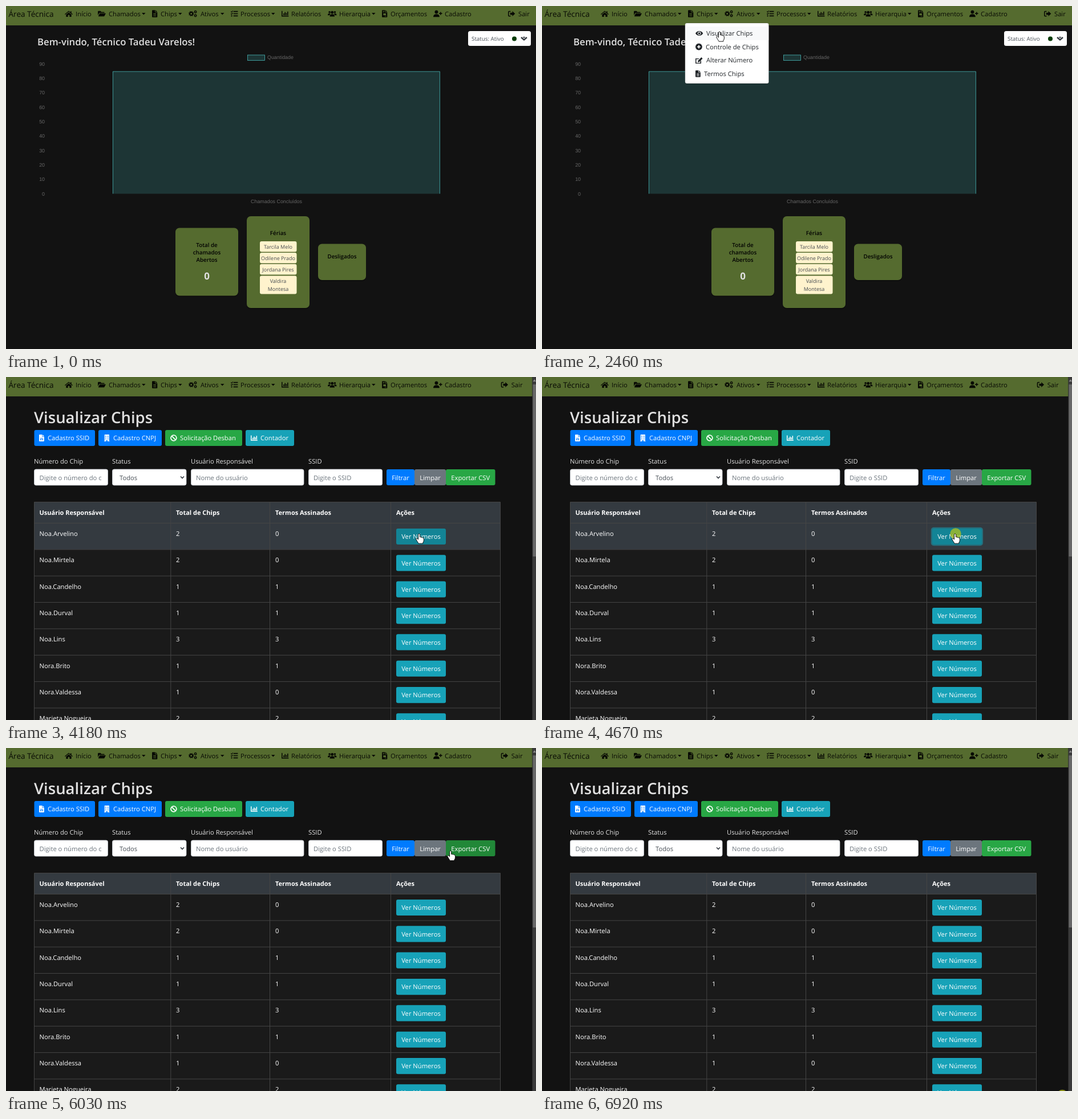
These frames come from a looping animation (929x602 px, 6990 ms). An HTML page:

```html
<!DOCTYPE html>
<html lang="pt-BR">
<head>
<meta charset="utf-8">
<title>Área Técnica</title>
<style>
  html, body { margin: 0; width: 100%; height: 100%; overflow: hidden; background: #121212; }
  svg { display: block; width: 929px; height: 602px; }
  text { font-family: "Open Sans", "Noto Sans", sans-serif; text-rendering: geometricPrecision; white-space: pre; }
  .b { font-weight: 700; }
  .s { font-weight: 600; }
  .m { text-anchor: middle; }
  .e { text-anchor: end; }
  .a { font-family: "Liberation Sans", Arial, sans-serif; }
</style>
</head>
<body>
<svg id="stage" viewBox="0 0 929 602" xmlns="http://www.w3.org/2000/svg"></svg>
<script>
const LOOP = 6990, PAGE = 3010, OPEN = 4730, CLOSE = 5690;
const OLIVE = '#556b2f', BG = '#121212', ROW = '#1a1a1a', SLATE = '#343a40', LIGHT = '#e0e0e0';
const BLUE = '#007bff', GREEN = '#28a745', TEAL = '#17a2b8', GREY = '#6c757d';

const txt = (x, y, s, fill = '#fff', size = 11.2, cls = '') =>
  `<text x="${x}" y="${y}" fill="${fill}" font-size="${size}" class="${cls}">${s}</text>`;
const box = (x, y, w, h, fill, r = 0, more = '') =>
  `<rect x="${x}" y="${y}" width="${w}" height="${h}" rx="${r}" fill="${fill}" ${more}/>`;
const line = (x1, y1, x2, y2, color) => `<path d="M${x1} ${y1}L${x2} ${y2}" stroke="${color}" stroke-width="1"/>`;
const path = d => `<path d="${d}"/>`;
const group = (id, s) => `<g id="${id}">${s}</g>`;

// Boxes that change colour under the pointer
const hots = [];
function hot(scene, x, y, w, h, base, over, r = 0) {
  hots.push({ scene, x, y, w, h, base, over });
  return box(x, y, w, h, base, r, `id="hot${hots.length - 1}"`);
}

const gear = (x, y, r) =>
  `<g fill="none" stroke="currentColor"><circle cx="${x}" cy="${y}" r="${r}" stroke-width="${r * .8}"/>` +
  `<circle cx="${x}" cy="${y}" r="${r * 1.55}" stroke-width="${r * .5}" stroke-dasharray="${r * .66} ${r * .557}"/></g>`;
const stroke = (d, w) => `<path d="${d}" fill="none" stroke="currentColor" stroke-width="${w}"/>`;
const sheet = 'M0 1.2Q0 0 1.2 0H7v5h5v9.8Q12 16 10.8 16H1.2Q0 16 0 14.8zM8 0l4 4H8z';

const icons = {
  home: path('M9 1.5 0 9l1 1.2 8-6.6 8 6.6L18 9l-3-2.5V2.5h-2.2v2.2zM9 5 3 10v5h4.3v-4h3.4v4H15v-5z'),
  folder: path('M0 12V3.5Q0 2 1.5 2H6l2 2h5.5Q15 4 15 5.5V6H4.5Q3 6 2.3 7.3zM1 14 3.7 8Q4.2 7 5.2 7H18l-3 6q-.5 1-1.5 1z'),
  file: path(sheet + 'M3 7.5h6v1H3zM3 10h6v1H3zM3 12.5h6v1H3z'),
  invoice: path(sheet + 'M2 2h3v1H2zM2 4h3v1H2zM3 7.5h6v4H3zM6 13h4v1H6z'),
  sim: path(sheet + 'M2.5 8h7v1.4h-7zM2.5 10.8h3v2.4h-3zM6.7 10.8h2.8v2.4H6.7z'),
  cogs: gear(6, 8, 3.3) + gear(15.5, 3.8, 2) + gear(15.5, 12.2, 2),
  tasks: path('M6 2h10v2H6zM6 7h10v2H6zM6 12h10v2H6z') + stroke('M.3 3 1.8 4.5 4.6 1.3M.3 8 1.8 9.5 4.6 6.3', 1.5) + '<circle cx="2" cy="13" r="1.5"/>',
  chart: path('M0 2h2v10.5h14v2H0zM4 7.5h2v4H4zM7 4.5h2v7H7zM10 6.5h2v5h-2zM13 3h2v8.5h-2z'),
  users: '<circle cx="4" cy="4.5" r="2.3"/><circle cx="16" cy="4.5" r="2.3"/><circle cx="10" cy="5" r="3.2"/>' +
    path('M0 11.5Q0 7.5 3.5 7.5 5.5 7.5 6.3 8.4 4.5 9.5 4.2 11.5zM20 11.5Q20 7.5 16.500 7.5 14.500 7.5 13.700 8.4 15.500 9.500 15.800 11.500zM4.500 14.500Q4.500 9 10 9t5.500 5.500z'),
  userPlus: '<circle cx="7" cy="4.200" r="3.800"/>' + path('M0 15.500Q0 9 7 9t7 6.500zM15.500 4h2v2.500H20v2h-2.500V11h-2V8.500H13v-2h2.500z'),
  exit: path('M6 1.500H2.500Q0 1.500 0 4v8q0 2.500 2.500 2.500H6v-2H3Q2 12.500 2 11.500v-7Q2 3.500 3 3.500h3zM10 2l6.500 6L10 14v-3.500H5v-5h5z'),
  eye: path('M0 8Q3 2.500 9 2.500T18 8Q15 13.500 9 13.500T0 8zM9 4a4 4 0 1 0 .01 0zM9 5.500a2.500 2.500 0 1 1-.01 0z'),
  plus: path('M8 0a8 8 0 1 0 .01 0zM6.800 4h2.400v2.800H12v2.400H9.200V12H6.800V9.200H4V6.800h2.800z'),
  edit: path('M0 3.500h9l-2 2H2V14h9.500V10l2-2v8H0zM6 9 14 1l3 3-8 8-3.500.5z'),
  building: path('M1 0h11v15h1v1H8v-3H5v3H0v-1h1zM3 2.500h2v2H3zM8 2.500h2v2H8zM3 5.800h2v2H3zM8 5.800h2v2H8zM3 9.200h2v2H3zM8 9.200h2v2H8z'),
  ban: '<circle cx="8" cy="8" r="6.700" fill="none" stroke="currentColor" stroke-width="2.400"/>' + stroke('M3.500 3.500l9 9', 2.400),
  times: stroke('M3 3l10 10M13 3 3 13', 3.600),
  history: stroke('M2.600 5.500A6.300 6.300 0 1 1 3.500 12.500M8.300 4.500v4l2.700 1.800', 2) + path('M.5 1v6h6z')
};
const icon = (name, x, cy, size, color = '#0b0e06') =>
  `<g transform="translate(${x} ${cy - size / 2}) scale(${size / 16})" fill="${color}" color="${color}" fill-rule="evenodd">${icons[name]}</g>`;

function nav() {
  const ink = '#080a04';
  const items = [
    ['home', 103, 122, 'Início'], ['folder', 161, 180, 'Chamados', 238], ['file', 256, 271, 'Chips', 302],
    ['cogs', 320, 341, 'Ativos', 376], ['tasks', 394, 411, 'Processos', 465], ['chart', 483, 500, 'Relatórios'],
    ['users', 564, 584, 'Hierarquia', 641], ['invoice', 659, 674, 'Orçamentos'], ['userPlus', 749, 769, 'Cadastro']
  ];
  return box(0, 0, 929, 34, OLIVE) + txt(4.5, 19, 'Área Técnica', ink, 13.6) +
    items.map(([name, ix, tx, label, caret]) => icon(name, ix, 13.5, 12.4, ink) + txt(tx, 18, label, ink) +
      (caret ? `<path d="M${caret} 12h6.500l-3.250 3.500z" fill="${ink}"/>` : '')).join('') +
    group('exit', icon('exit', 880, 13.5, 12, ink) + txt(898, 18, 'Sair', ink));
}

function dashboard() {
  const card = (x, y, w, h) => box(x, y + 2, w, h, 'rgba(0,0,0,.3)', 7) + box(x, y, w, h, OLIVE, 7);
  const head = (x, y, s) => txt(x, y, s, '#000', 9.8, 's m');
  const tag = (y, h, ...names) => box(445, y, 64.5, h, '#fff3cd', 3) +
    names.map((n, i) => txt(477, y + 12.8 + i * 14, n, '#454b50', 9, 'm')).join('');
  let s = txt(55, 69, 'Bem-vindo, Técnico Tadeu Varelos!', LIGHT, 16.7, 's');
  s += box(810, 44, 110, 26, '#fff', 3.500) + txt(816, 61, 'Status: Ativo', '#495057', 9.8) +
    '<circle cx="891" cy="57.500" r="4" fill="#063b06"/>' +
    '<path d="M903 55l5 4.500 5-4.500" fill="none" stroke="#343a40" stroke-width="2.400"/><path d="M905.500 54h5l-2.500 2.500z" fill="#343a40"/>';
  s += box(423.5, 86, 30, 9.5, '#1d3535', 0, 'stroke="#4bc0c0" stroke-width=".75"') + txt(458, 93, 'Quantidade', '#666', 8.9, 'a');
  for (let i = 0; i < 10; i++) s += txt(68, 332.5 - i * 25.3, i * 10, '#666', 8.9, 'a e');
  s += box(187.4, 115, 573, 214.5, '#1d3535', 0, 'id="bar"') +
    '<path d="M187.400 329.500V115h573v214.500" fill="none" stroke="#4bc0c0" stroke-width=".75"/>' +
    txt(474, 346, 'Chamados Concluídos', '#666', 8.9, 'a m');
  s += card(297, 389.5, 110, 119) + head(352, 422.5, 'Total de') + head(352, 436, 'chamados') + head(352, 448.5, 'Abertos') +
    txt(352, 480, '0', LIGHT, 17, 'b m');
  s += card(422, 369, 110, 161) + head(477, 402, 'Férias') + tag(413, 18.5, 'Tarcila Melo') + tag(433, 18.5, 'Odilene Prado') +
    tag(453, 18.5, 'Jordana Pires') + tag(473.5, 32, 'Valdira', 'Montesa');
  s += card(547, 417.5, 84, 63.5) + head(589, 443, 'Desligados');
  s += group('tip', box(481, 102, 103, 27, 'rgba(0,0,0,.8)', 4) + '<path d="M481 111v8l-4.500-4z" fill="rgba(0,0,0,.8)"/>' +
    txt(485.5, 112.5, 'Chamados Concluídos', '#fff', 8.9, 'a b') +
    box(486, 117.5, 8, 8, '#1d3535', 0, 'stroke="#4bc0c0" stroke-width=".8"') + txt(497.5, 125, 'Quantidade: 85', '#fff', 8.9, 'a'));
  return s;
}

function menu() {
  const items = [['eye', 288, 'Visualizar Chips'], ['plus', 287, 'Controle de Chips'], ['edit', 288, 'Alterar Número'], ['file', 284, 'Termos Chips']];
  return box(250.8, 30, 146.7, 106, '#fff', 3, 'stroke="rgba(0,0,0,.25)" stroke-width=".7"') + box(251.2, 36, 146, 24, '#f8f9fa', 0, 'id="pick"') +
    items.map(([name, x, label], i) => `<g${i ? '' : ' id="first"'}>` + icon(name, 269, 48 + i * 23.6, 11.8, '#212529') +
      txt(x, 52 + i * 23.6, label, '#212529') + '</g>').join('');
}

function chipsPage() {
  const button = (x, w, color, over, name, ix, tx, label) =>
    hot(1, x, 93, w, 28, color, over, 3) + icon(name, ix, 107, 11.8, '#fff') + txt(tx, 111, label);
  const field = (x, w, label, hint, tx, color = GREY) => txt(x, 151.5, label, LIGHT) +
    box(x + .5, 162, w - 1, 28, '#fff', 3, 'stroke="#ced4da" stroke-width=".8"') + txt(tx, 181, hint, color);
  const action = (x, w, color, over, label) => hot(1, x, 162, w, 28, color, over, 3) + txt(x + w / 2, 180.5, label, '#fff', 11.2, 'm');
  const rows = [['Noa.Arvelino', 2, 0], ['Noa.Mirtela', 2, 0], ['Noa.Candelho', 1, 1], ['Noa.Durval', 1, 1],
    ['Noa.Lins', 3, 3], ['Nora.Brito', 1, 1], ['Nora.Valdessa', 1, 0], ['Marieta Nogueira', 2, 2]];

  let s = txt(49, 81, 'Visualizar Chips', LIGHT, 27.5, 's');
  s += button(49.5, 106.5, BLUE, '#0069d9', 'sim', 58, 73, 'Cadastro SSID') + button(162, 111, BLUE, '#0069d9', 'building', 172, 188, 'Cadastro CNPJ') +
    button(279, 135, GREEN, GREEN, 'ban', 288, 305, 'Solicitação Desban') + button(420, 85, TEAL, '#138496', 'chart', 429, 446, 'Contador');
  s += field(49, 130, 'Número do Chip', 'Digite o número do c', 58.5) + field(186, 130.5, 'Status', 'Todos', 199, '#495057') +
    '<path d="M306 174.500l3 3 3-3" fill="none" stroke="#343a40" stroke-width="1.600"/>' +
    field(324, 198.5, 'Usuário Responsável', 'Nome do usuário', 333) + field(530, 130, 'SSID', 'Digite o SSID', 539);
  s += action(667, 49, BLUE, '#0069d9', 'Filtrar') + action(716, 55, GREY, '#5a6268', 'Limpar') + action(771, 86.5, GREEN, '#218838', 'Exportar CSV');

  s += box(49.5, 219.5, 817, 37, SLATE);
  [[58.5, 'Usuário Responsável'], [298, 'Total de Chips'], [472, 'Termos Assinados'], [684, 'Ações']]
    .forEach(([x, label]) => s += txt(x, 242, label, '#fff', 11, 'b'));
  rows.forEach(([name, total, signed], i) => {
    const y = 256.5 + i * 46.35;
    s += hot(1, 49.5, y, 817, 46.35, ROW, SLATE) + line(49.5, y, 866.5, y, '#454545') +
      txt(58.5, y + 22.5, name) + txt(298, y + 22.5, total) + txt(472, y + 22.5, signed);
    if (!i) s += box(681.7, y + 7.2, 91.4, 32.6, 'rgba(23,162,184,.5)', 5, 'id="ring"');
    s += hot(1, 684, y + 9.4, 87, 28.2, TEAL, '#138496', 3) + txt(727.5, y + 27.8, 'Ver Números', '#fff', 11.2, 'm');
  });
  s += line(49.5, 219.5, 866.5, 219.5, '#454545');
  [49.5, 288.8, 462.5, 674.5, 866.5].forEach(x => s += line(x, 219.5, x, 602, '#454545'));
  s += box(922.5, 0, 6.5, 602, BG);
  s += group('scroll', box(922.5, 0, 6.5, 602, '#3a3a3a') + box(923.5, 13, 5.5, 302, '#686868') + '<path d="M923.500 8l3-4 2.500 4z" fill="#8a8a8a"/>');
  return s;
}

function modal() {
  const lines = (x, y, list, cls = '', size = 11.2) => list.map((v, i) => txt(x, y + i * 17.8, v, '#fff', size, cls)).join('');
  const head = (x, ...list) => lines(x, 130 - (list.length - 1) * 17.6, list, 'b', 11);
  const row = (y, phone, kind) => hot(2, 176, y, 564, 71.5, ROW, '#363c43') + txt(185, y + 23, phone) +
    box(187, y + 28.5, 15.5, 19.5, '#dc3545', 2.500) + icon('times', 189.7, y + 38.5, 10, '#fff') +
    icon('history', 209, y + 37, 10.5, BLUE) + `<circle cx="228.300" cy="${y + 37}" r="5.500" fill="#25d366"/>` +
    lines(288.5, y + 23, ['Não', 'disponível']) + lines(367, y + 23, ['Falavento', kind]) + lines(479, y + 23, ['00.123.456/0001-', '00']) +
    lines(591.5, y + 23, ['CASA DE', 'ENSINO TALVEI', 'LTDA - ZULO']) + icon('file', 697, y + 18.5, 12, GREEN);
  let s = box(0, 0, 929, 602, 'rgba(0,0,0,.5)') + box(164.3, 14, 587, 348, OLIVE, 3.5, 'stroke="rgba(0,0,0,.2)"');
  s += txt(175.5, 43, 'Números de Noa.Arvelino', '#fff', 13.7, 's') + icon('times', 727.5, 37, 11, '#c3ccb4');
  s += line(164.5, 60, 751, 60, '#465927') + line(164.5, 311.5, 751, 311.5, '#465927');
  s += box(176, 72, 564, 72.5, SLATE) + head(185, 'Número') + head(288.5, 'Próxima', 'Troca') + head(367, 'Observação', '(Tipo', 'Falavento)') +
    head(479, 'CNPJ') + head(591.5, 'Razão Social') + head(697, 'Ações');
  s += row(144.5, '33900000147', 'Comércio') + row(216, '33900000258', 'Normal');
  [72.5, 144.5, 216, 287.5].forEach(y => s += line(176, y, 740, y, '#555'));
  [176.5, 279.5, 358, 469.5, 582.5, 687.5, 739.5].forEach(x => s += line(x, 72, x, 288, '#555'));
  return s + box(687.5, 323.5, 52.5, 27.5, '#444', 3) + txt(713.7, 342, 'Fechar', '#fff', 11.2, 'm');
}

const pointers = {
  arrow: '<path d="M0 0V15.500l3.700-3.300 2.400 5.500 2.400-1-2.400-5.400h5z" fill="#fff" stroke="#000" stroke-width=".9"/>',
  hand: '<path d="M-1.500 1Q0-1 1.500 1V6q1.500-.9 2.500.4 1.600-.6 2.300.8 1.900-.3 2 1.300V12q0 2-1.500 3.700v1.500H-1q-.6-1.700-2.200-3.700L-5 10.200q-.8-1.700.6-2.100 1-.2 2.900 2z" fill="#fff" stroke="#000" stroke-width=".9"/>',
  beam: '<path d="M-2.500-6q2 0 2.500 1 .5-1 2.500-1M0-5V5M-2.500 6q2 0 2.500-1 .5 1 2.500 1" fill="none" stroke="#ddd" stroke-width="1"/>'
};

// Pointer path: time, x, y, shape from here on
const track = [
  [70, 872, 592, 'arrow'], [550, 560, 240, 'arrow'], [750, 556, 232, 'arrow'], [1100, 500, 114, 'arrow'], [1440, 412, 54, 'arrow'],
  [1650, 330, 30, 'hand'], [1780, 287, 20, 'hand'], [1920, 287, 20, 'hand'], [2460, 311, 45, 'hand'], [3010, 311, 45, 'hand'],
  [3080, 311, 45, 'arrow'], [3280, 311, 45, 'arrow'], [3500, 360, 93, 'hand'], [3560, 381, 104, 'hand'], [3620, 430, 123, 'arrow'],
  [3900, 700, 268, 'hand'], [3970, 726, 288, 'hand'], [4180, 724, 275, 'hand'], [4730, 724, 275, 'arrow'], [4930, 722, 268, 'arrow'],
  [5020, 672, 200, 'beam'], [5070, 653, 176, 'beam'], [5200, 676, 135, 'arrow'], [5460, 738, 30, 'hand'], [5530, 743, 22, 'hand'],
  [5690, 743, 22, 'arrow'], [5990, 777, 163, 'hand'], [6030, 779, 180, 'hand'], [6065, 783, 195, 'arrow'], [6360, 832, 492, 'arrow'], [6710, 874, 612, 'arrow']
];
// Click marks: from, to, x, y
const clicks = [[1780, 1920, 287, 20], [2860, 3010, 311, 47], [4600, 4730, 725, 275], [5530, 5690, 743, 22], [6920, 6990, 912, 609.5]];

const stage = document.getElementById('stage');
stage.innerHTML = box(0, 0, 929, 602, BG) + nav() + group('dash', dashboard()) + group('menu', menu()) +
  group('chips', chipsPage()) + group('modal', modal()) +
  '<circle id="click" r="9.700" fill="rgba(190,197,19,.7)"/>' +
  group('pointer', Object.entries(pointers).map(([k, v]) => group(k, v)).join(''));

const el = id => document.getElementById(id);
const show = (id, on) => { el(id).style.display = on ? '' : 'none'; };
const within = (t, a, b) => t >= a && t < b;
const ramp = (t, a, b) => Math.min(1, Math.max(0, (t - a) / (b - a)));
const mix = (a, b, k) => a + (b - a) * k;

function pointerAt(t) {
  const i = track.findIndex(k => k[0] > t);
  if (i < 1) return null;
  const a = track[i - 1], b = track[i], k = (t - a[0]) / (b[0] - a[0]);
  return { x: mix(a[1], b[1], k), y: mix(a[2], b[2], k), shape: a[3] };
}

function draw(t) {
  const scene = t < PAGE ? 0 : within(t, OPEN, CLOSE) ? 2 : 1;
  show('dash', scene === 0);
  show('menu', within(t, 1920, PAGE));
  show('chips', scene > 0);
  show('scroll', scene === 1);
  show('modal', scene === 2);
  el('exit').setAttribute('transform', `translate(${scene ? -12.3 : 0} 0)`);

  const p = pointerAt(t);
  show('pointer', p);
  if (p) {
    el('pointer').setAttribute('transform', `translate(${p.x} ${p.y})`);
    for (const k in pointers) show(k, k === p.shape);
  }

  hots.forEach((h, i) => {
    const over = p && scene === h.scene && within(p.x, h.x, h.x + h.w) && within(p.y, h.y, h.y + h.h);
    el('hot' + i).setAttribute('fill', over ? h.over : h.base);
  });

  const glow = ramp(t, 425, 560) * (1 - ramp(t, 1100, 1440));
  el('bar').setAttribute('fill', `rgb(${mix(29, 21, glow)},${mix(53, 56, glow)},${mix(53, 56, glow)})`);
  el('tip').setAttribute('opacity', glow);

  const active = within(t, 2860, PAGE);
  el('pick').setAttribute('fill', active ? BLUE : p && p.y > 36 ? '#f8f9fa' : '#fff');
  el('first').querySelector('text').setAttribute('fill', active ? '#fff' : '#212529');
  el('first').querySelector('g').setAttribute('fill', active ? '#fff' : '#212529');
  show('ring', within(t, 4600, OPEN));

  const c = clicks.find(k => within(t, k[0], k[1]));
  show('click', c);
  if (c) el('click').setAttribute('transform', `translate(${c[2]} ${c[3]})`);
}

const start = performance.now();
function tick() {
  draw((performance.now() - start) % LOOP);
  requestAnimationFrame(tick);
}
tick();
</script>
</body>
</html>
```
